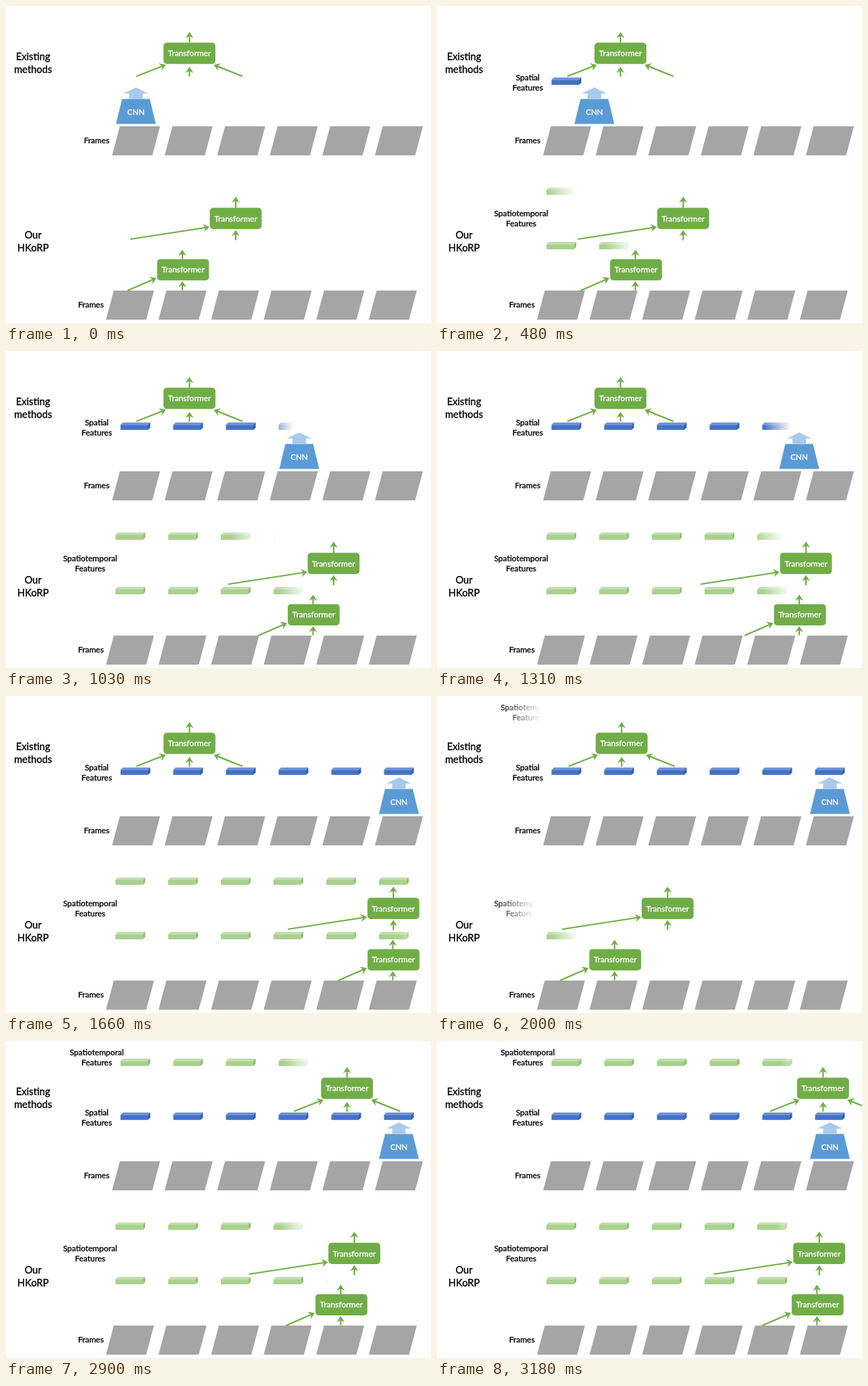
Animation of 629 by 469 pixels, one loop 3250 ms. Source, as an HTML page with a canvas:

```html
<!DOCTYPE html>
<html lang="en">
<head>
<meta charset="utf-8">
<title>Feature pipelines</title>
<style>
html, body { margin: 0; width: 100%; height: 100%; overflow: hidden; background: #fff; }
canvas { display: block; }
</style>
</head>
<body>
<canvas id="stage" width="629" height="469"></canvas>
<script>
const ctx = document.getElementById('stage').getContext('2d');
const LOOP = 3250, RESET = 1800;
const MOVE = 1400, WIPE = 280, SOFT = 0.9;
const HOLDS = [0, 830, 1870, 2770];
const FONT = 'Lato, Carlito, "Open Sans", sans-serif';
const GREEN = '#70ad47', BLACK = '#000000', WHITE = '#ffffff';
const BLUE_BAR = ['#4472c4', '#6f92d6', '#345fae'];
const GREEN_BAR = ['#a9d18e', '#c0deac', '#8fbf70'];

// The picture advances in steps of 70 ms, with a few longer holds.
function snap(t) {
  let s = 0;
  for (;;) {
    const next = s + (HOLDS.includes(s) ? 130 : 70);
    if (next > t) return s;
    s = next;
  }
}

// Constant speed with a quarter of the time for each ramp.
function ease(x) {
  x = Math.min(1, Math.max(0, x));
  const v = 4 / 3;
  if (x < 0.25) return 2 * v * x * x;
  if (x > 0.75) return 1 - 2 * v * (1 - x) * (1 - x);
  return v * (x - 0.125);
}

// Soft left-to-right wipe; q runs from 0 to 1.
function wipePaint(color, x, w, q) {
  if (q >= 1) return color;
  const a = q * (1 + SOFT) - SOFT;
  const g = ctx.createLinearGradient(x + w * a, 0, x + w * (a + SOFT), 0);
  g.addColorStop(0, color);
  g.addColorStop(1, color + '00');
  return g;
}

const progress = (t, middle) => (t - middle) / WIPE + 0.5;

function poly(paint, ...pts) {
  ctx.fillStyle = paint;
  ctx.beginPath();
  for (let i = 0; i < pts.length; i += 2) ctx.lineTo(pts[i], pts[i + 1]);
  ctx.closePath();
  ctx.fill();
}

// A hairline outline gives the letters a medium weight.
function label(lines, x, y, size = 12, color = BLACK, q = 1, leading = 14.8) {
  if (q <= 0) return;
  ctx.font = `${size}px ${FONT}`;
  ctx.textAlign = 'center';
  ctx.lineWidth = 0.35;
  const w = Math.max(...lines.map(s => ctx.measureText(s).width));
  ctx.fillStyle = ctx.strokeStyle = wipePaint(color, x - w / 2, w, q);
  lines.forEach((s, i) => {
    ctx.fillText(s, x, y + i * leading);
    ctx.strokeText(s, x, y + i * leading);
  });
}

const title = (lines, y) => label(lines, 40, y, 14.7, BLACK, 1, 19);
const caption = (word, x, y, q) => label([word, 'Features'], x, y, 12, BLACK, q);

function arrow(x1, y1, x2, y2) {
  const len = Math.hypot(x2 - x1, y2 - y1);
  ctx.save();
  ctx.translate(x2, y2);
  ctx.rotate(Math.atan2(y2 - y1, x2 - x1));
  ctx.strokeStyle = GREEN;
  ctx.lineWidth = 2.2;
  ctx.beginPath();
  ctx.moveTo(-len, 0);
  ctx.lineTo(-5, 0);
  ctx.stroke();
  poly(GREEN, 0, 0, -9, -6, -6, 0, -9, 6);
  ctx.restore();
}

function transformer(cx, top) {
  ctx.fillStyle = GREEN;
  ctx.beginPath();
  ctx.roundRect(cx - 38.4, top, 76.8, 31.5, 5);
  ctx.fill();
  label(['Transformer'], cx, top + 20, 12, WHITE);
}

function bar(x, y, [front, lid, side], q) {
  if (q <= 0) return;
  const paint = c => wipePaint(c, x, 44, q);
  poly(paint(lid), x, y + 3.5, x + 3.5, y, x + 44, y, x + 40.5, y + 3.5);
  poly(paint(side), x + 40.5, y + 3.5, x + 44, y, x + 44, y + 7.5, x + 40.5, y + 11);
  poly(paint(front), x, y + 3.5, x + 40.6, y + 3.5, x + 40.6, y + 11, x, y + 11);
}

function bars(x, y, colors, t, middle) {
  for (let k = 0; k < 6; k++) bar(x + 78 * k, y, colors, progress(t, middle(k)));
}

function frames(x, y) {
  for (let k = 0; k < 6; k++) {
    const l = x + 77.8 * k;
    poly('#a5a5a5', l + 11.5, y, l + 71, y, l + 59.5, y + 43, l, y + 43);
  }
}

function cnn(cx) {
  poly('#a8caec', cx, 120.5, cx + 18.5, 129.5, cx + 10, 129.5, cx + 10, 137,
    cx - 10, 137, cx - 10, 129.5, cx - 18.5, 129.5);
  poly('#5b9bd5', cx - 20.5, 137.5, cx + 20.5, 137.5, cx + 29.5, 174.5, cx - 29.5, 174.5);
  label(['CNN'], cx, 161.3, 11.6, WHITE);
}

const blueAt = k => k ? 258 + 212 * k : 100;
const lowerAt = k => k ? 278 * k - 25 : 50;
const upperFirst = k => 277 + 254 * Math.min(k, 2) + 168 * Math.max(0, k - 2);
const upperSecond = k => 275 + 222 * k;

function draw(t) {
  const second = t >= RESET;
  const rel = t - (second ? 1935 : 203);
  const p = ease(rel / MOVE);
  const textQ = progress(rel, 95);
  const blueT = second ? LOOP : rel;

  ctx.fillStyle = WHITE;
  ctx.fillRect(0, 0, 629, 469);

  frames(157, 178);
  frames(148, 421);
  title(['Existing', 'methods'], 79.6);
  title(['Our', 'HKoRP'], 344.4);
  label(['Frames'], 134.2, 203);
  label(['Frames'], 125.7, 446.2);

  caption('Spatial', 134.3, 110, second ? 1 : textQ);
  caption('Spatiotemporal', 124.5, 311, textQ);
  if (second) caption('Spatiotemporal', 134.3, 20.7, textQ);

  bars(169.5, 105.8, BLUE_BAR, blueT, blueAt);
  bars(162, 348.9, GREEN_BAR, rel, lowerAt);
  bars(162, 268.4, GREEN_BAR, rel, second ? upperSecond : upperFirst);
  if (second) bars(169.5, 25.9, GREEN_BAR, rel, upperSecond);

  cnn(second ? 581.5 : 192.3 + 389.2 * p);

  const top = 271.5 + (second ? 310 * p : 0);
  arrow(top, 54, top, 38.5);
  arrow(top, 104.5, top, 90);
  arrow(top - 78.5, 104, top - 35, 87);
  arrow(top + 78.5, 104, top + 36, 87);
  transformer(top, 54.2);

  const upper = 340 + 233.3 * p;
  arrow(upper, 298.5, upper, 282);
  arrow(upper, 346.5, upper, 331.5);
  arrow(upper - 156, 345, upper - 39, 327);
  transformer(upper, 298.5);

  const lower = 262 + 311.5 * p;
  arrow(lower - 1, 374.5, lower - 1, 360.5);
  arrow(lower - 1, 420.5, lower - 1, 407);
  arrow(lower - 82, 421, lower - 39.5, 402.5);
  transformer(lower, 374.4);
}

const start = performance.now();
function tick() {
  draw(snap((performance.now() - start) % LOOP));
  requestAnimationFrame(tick);
}
tick();
</script>
</body>
</html>
```
